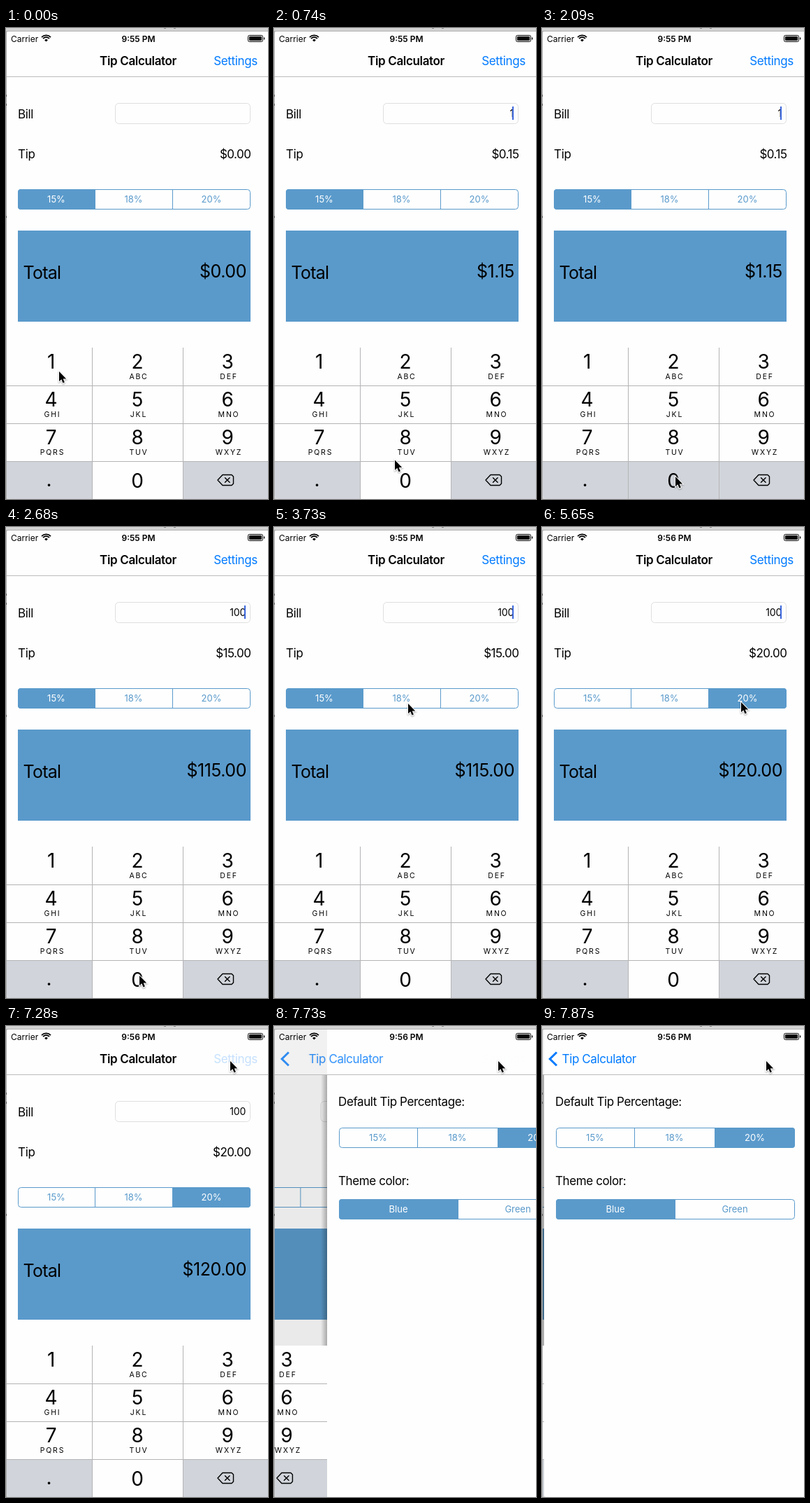
An HTML page with a canvas for the animation above (8 s loop, 375 by 672 pixels).

```html
<!DOCTYPE html>
<html lang="en">
<head>
<meta charset="utf-8">
<title>Tip Calculator</title>
<style>
html, body { margin: 0; width: 100%; height: 100%; overflow: hidden; background: #fff; }
canvas { display: block; width: 375px; height: 672px; }
</style>
</head>
<body>
<canvas id="stage"></canvas>
<script>
const W = 375, H = 672, LOOP = 8000, STEP = 148.6;
const BLUE = '#5a9acb', TINT = '#007aff', GREY = '#d1d5db', LINE = '#b4b4b6', PAGE = '#fefefe';
const FAMILY = 'Inter, Roboto, "Liberation Sans", sans-serif';
const canvas = document.getElementById('stage');
const ctx = canvas.getContext('2d');
const dpr = window.devicePixelRatio || 1;
canvas.width = W * dpr;
canvas.height = H * dpr;

function rect(x, y, w, h, color) {
  ctx.fillStyle = color;
  ctx.fillRect(x, y, w, h);
}

function text(s, x, y, size, { align = 'left', color = '#000', weight = 400, track = 0 } = {}) {
  ctx.font = `${weight} ${size}px ${FAMILY}`;
  ctx.letterSpacing = `${track * size}px`;
  ctx.textAlign = align;
  ctx.fillStyle = color;
  ctx.fillText(s, x, y);
}

function path(points, close) {
  ctx.beginPath();
  points.forEach(([x, y], i) => i ? ctx.lineTo(x, y) : ctx.moveTo(x, y));
  if (close) ctx.closePath();
}

function stroke(color, width) {
  ctx.strokeStyle = color;
  ctx.lineWidth = width;
  ctx.stroke();
}

function rounded(x, y, w, h, r) {
  ctx.beginPath();
  ctx.roundRect(x, y, w, h, r);
}

function withAlpha(alpha, draw) {
  if (alpha <= 0) return;
  ctx.save();
  ctx.globalAlpha *= alpha;
  draw();
  ctx.restore();
}

function shifted(dx, draw) {
  ctx.save();
  ctx.translate(dx, 0);
  draw();
  ctx.restore();
}

// edges: segment borders; fills: how selected each segment is, 0 to 1
function segments(edges, y, labels, fills) {
  const x = edges[0], w = edges[edges.length - 1] - x, h = 29;
  ctx.save();
  rounded(x, y, w, h, 4);
  ctx.clip();
  fills.forEach((a, i) => withAlpha(a, () => rect(edges[i], y, edges[i + 1] - edges[i], h, BLUE)));
  ctx.restore();
  edges.slice(1, -1).forEach(e => rect(e, y, 1, h, BLUE));
  rounded(x + .5, y + .5, w - 1, h - 1, 4);
  stroke(BLUE, 1);
  labels.forEach((s, i) => {
    const cx = (edges[i] + edges[i + 1]) / 2;
    const label = color => text(s, cx, y + 19, 13, { align: 'center', color });
    withAlpha(1 - fills[i], () => label(BLUE));
    withAlpha(fills[i], () => label('#fff'));
  });
}

// ---- state at a given step ----

const ease = p => p * p * (3 - 2 * p);
const moves = [
  [2, 6, 76, 490, 191, 640],
  [19, 25, 191, 640, 192, 252],
  [28, 32, 192, 252, 285, 250],
  [39, 45, 285, 250, 321, 50]
];

function pointer(k) {
  let at = [76, 490];
  for (const [from, to, x0, y0, x1, y1] of moves) {
    if (k < from) break;
    const p = ease(Math.min(1, (k - from) / (to - from)));
    at = [x0 + (x1 - x0) * p, y0 + (y1 - y0) * p];
  }
  return at;
}

function caretAlpha(k) {
  if (k < 3 || k >= 49) return 0;
  if (k < 21) return k >= 9 && k < 12 ? 0 : 1;
  return [0, 0, .5, 1, 1, 1, 1][(k - 21) % 7];
}

function tipFills(k) {
  if (k < 26) return [1, 0, 0];
  if (k < 27) return [1, .15, 0];
  if (k < 28) return [.4, .6, 0];
  if (k < 33) return [0, 1, 0];
  if (k < 34) return [0, 1, .15];
  if (k < 35) return [0, .4, .6];
  return [0, 0, 1];
}

function pressedKey(k) {
  if (k === 1 || k === 2) return '1';
  return k === 13 || k === 14 || k === 17 ? '0' : '';
}

// ---- parts ----

function calculator(k) {
  const bill = k < 3 ? 0 : k < 15 ? 1 : k < 18 ? 10 : 100;
  const tip = bill * (k < 27 ? .15 : k < 34 ? .18 : .2);
  const money = n => '$' + n.toFixed(2);
  rect(1, 70, 374, 602, PAGE);
  text('Bill', 17, 129, 17, { track: -.02 });
  rounded(156.5, 107.5, 193, 29, 5);
  stroke('#dfdfdf', 1);
  if (bill) text(String(bill), 343, 127, 14, { align: 'right', track: -.015 });
  withAlpha(caretAlpha(k), () => rect(341, 112, 2, 19, '#3b66dc'));
  text('Tip', 17, 186, 17, { track: -.02 });
  text(money(tip), 350.5, 186, 17, { align: 'right', track: -.03 });
  segments([17, 127, 238, 350], 230, ['15%', '18%', '20%'], tipFills(k));
  rect(17, 289, 333, 130, BLUE);
  text('Total', 24.5, 358, 25, { track: -.03 });
  text(money(bill + tip), 344, 356, 25, { align: 'right', track: -.018 });
}

const KEYS = [['1', ''], ['2', 'ABC'], ['3', 'DEF'], ['4', 'GHI'], ['5', 'JKL'], ['6', 'MNO'],
  ['7', 'PQRS'], ['8', 'TUV'], ['9', 'WXYZ'], ['.', ''], ['0', ''], ['<', '']];

function keypad(pressed) {
  const left = [1, 124, 254, 375], mid = [64.5, 188, 317];
  KEYS.forEach(([key, sub], i) => {
    const col = i % 3, row = Math.floor(i / 3), y = 456 + row * 54;
    const grey = key === '.' || key === '<' || key === pressed;
    rect(left[col], y, left[col + 1] - left[col], 54, grey ? GREY : PAGE);
    if (key === '<') return eraser();
    if (key === '.') return text('.', 61.5, 654, 28, { align: 'center' });
    text(key, mid[col], key === '0' ? 656 : y + 30, 28, { align: 'center', track: -.01 });
    if (sub) text(sub, mid[col] + 2, y + 45, 10.5, { align: 'center', track: .17 });
  });
  [510, 564, 618].forEach(y => rect(1, y, 374, 1, LINE));
  [123, 253].forEach(x => rect(x, 456, 1, 216, LINE));
}

function eraser() {
  ctx.lineJoin = ctx.lineCap = 'round';
  path([[303, 645], [310, 637.5], [323, 637.5], [325.5, 640], [325.5, 650], [323, 652.5], [310, 652.5]], true);
  stroke('#000', 1.4);
  path([[313.5, 641.7], [320.1, 648.3]]);
  stroke('#000', 1.4);
  path([[320.1, 641.7], [313.5, 648.3]]);
  stroke('#000', 1.4);
}

function settings() {
  rect(1, 70, 374, 602, PAGE);
  text('Default Tip Percentage:', 17, 114, 17, { track: -.023 });
  segments([18, 130, 245, 360], 145, ['15%', '18%', '20%'], [0, 0, 1]);
  text('Theme color:', 17, 227, 17, { track: -.023 });
  segments([18, 188, 360], 247, ['Blue', 'Green'], [1, 0]);
}

function statusBar(k) {
  text('Carrier', 7, 19.5, 12);
  ctx.lineCap = 'butt';
  [3.4, 6.4, 9.2].forEach((r, i) => {
    ctx.beginPath();
    ctx.arc(57.5, 19.6, r, -Math.PI * .75, -Math.PI * .25);
    if (i) return stroke('#000', 1.7);
    ctx.lineTo(57.5, 19.6);
    ctx.fillStyle = '#000';
    ctx.fill();
  });
  text(k < 29 ? '9:55 PM' : '9:56 PM', 189.5, 19.5, 12, { align: 'center', weight: 600 });
  rounded(346.5, 10.5, 21, 9, 2);
  stroke('#000', 1);
  rounded(348, 12, 18, 6, 1);
  ctx.fillStyle = '#000';
  ctx.fill();
  rect(369, 13.5, 1.3, 3, '#000');
}

// p: progress of the push to the settings page
function navBar(k, p) {
  rect(1, 5, 374, 64, PAGE);
  rect(1, 69, 374, 1, '#bcbcbe');
  withAlpha(1 - p * 1.2, () => {
    text('Tip Calculator', 189 - 108 * p, 53, 17, { align: 'center', weight: 600, track: -.02 });
  });
  withAlpha((k < 48 ? 1 : .22) * (p ? 1 - p * 1.2 : 1), () => {
    text('Settings', 360, 53, 17, { align: 'right', color: TINT, track: -.02 });
  });
  withAlpha(p, () => {
    ctx.lineCap = 'butt';
    ctx.lineJoin = 'miter';
    path([[21, 37.5], [11.3, 47], [21, 56.5]]);
    stroke(TINT, 3);
    text('Tip Calculator', 28 + 108 * (1 - p), 53, 17, { color: TINT, track: -.023 });
  });
}

function arrow([x, y]) {
  ctx.save();
  ctx.translate(x, y);
  ctx.lineJoin = 'miter';
  path([[0, 0], [0, 14.3], [3.3, 11.3], [5.5, 16.6], [7.9, 15.6], [5.7, 10.4], [10.2, 10.4]], true);
  ctx.shadowColor = 'rgba(0,0,0,.35)';
  ctx.shadowBlur = 2 * dpr;
  ctx.shadowOffsetY = dpr;
  stroke('#fff', 2);
  ctx.shadowColor = 'transparent';
  ctx.fillStyle = '#000';
  ctx.fill();
  ctx.restore();
}

function desktop() {
  rect(0, 0, W, H, '#d3d3d3');
  rect(0, 4, W, 1, '#b2b2b2');
  rect(0, 5, 1, H, '#a9a9a9');
  [95, 108, 268].forEach(y => rect(0, y, 1, 3, '#555'));
  rect(226, 0, 3, 1, '#888');
  rect(240, 0, 3, 1, '#888');
}

function draw(k) {
  ctx.setTransform(dpr, 0, 0, dpr, 0, 0);
  desktop();
  ctx.save();
  rounded(1, 5, 374, 667, [3, 0, 0, 5]);
  ctx.clip();
  const offset = k < 52 ? 374 : k < 53 ? 75 : 2;
  const p = 1 - offset / 374;
  shifted(-112 * p, () => calculator(k));
  if (p) {
    rect(1, 70, offset, 602, `rgba(0,0,0,${.1 * p})`);
    const edge = 1 + offset, shade = ctx.createLinearGradient(edge - 9, 0, edge, 0);
    shade.addColorStop(0, 'rgba(0,0,0,0)');
    shade.addColorStop(1, 'rgba(0,0,0,.28)');
    rect(edge - 9, 70, 9, 602, shade);
  }
  if (p) shifted(offset, settings);
  shifted(-374 * p, () => keypad(pressedKey(k)));
  navBar(k, p);
  if (p) rect(1, 5, offset, 64, 'rgba(0,0,0,.05)');
  statusBar(k);
  ctx.restore();
  arrow(pointer(k));
}

const start = performance.now();
function tick() {
  const t = (performance.now() - start) % LOOP;
  draw(Math.floor((t + 10) / STEP));
  requestAnimationFrame(tick);
}
tick();
</script>
</body>
</html>
```
